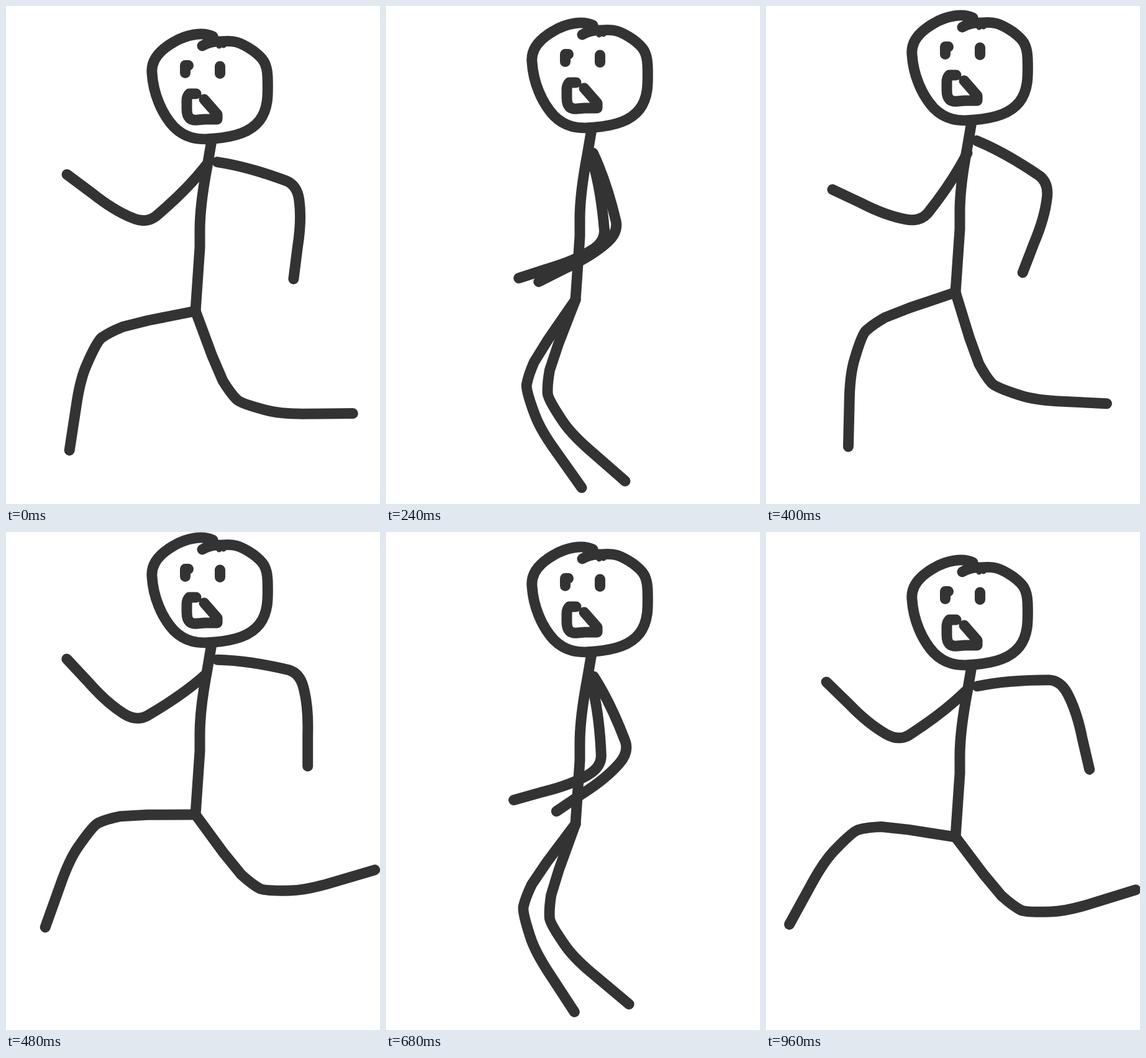
An HTML page for the animation above (1000 ms loop, 602 by 800 pixels).

```html
<!DOCTYPE html>
<html lang="en">
<head>
<meta charset="utf-8">
<title>Running stick figure</title>
<style>
  html, body { margin: 0; width: 100%; height: 100%; overflow: hidden; background: #fff; }
  svg { display: block; width: 100%; height: 100%; }
</style>
</head>
<body>
<svg viewBox="0 0 602 800">
  <defs>
    <path id="leg" d="M0 0L-46 62-70 98Q-80 119-83 133Q-85 142-72 181Q-65 203-45 234L0 302"/>
    <path id="arm" d="M7 8Q43 42 81 97Q91 113 80 134Q65 163 34 195L0 232.5"/>
  </defs>
  <g id="runner" fill="none" stroke="#333" stroke-width="17" stroke-linecap="round" stroke-linejoin="round">
    <!-- head and hair -->
    <path d="M333 49C316 41 290 46 270 58C247 71 233 87 235 108C237 140 250 172 270 194C288 212 308 216 335 213C370 210 394 202 408 184C422 166 422 144 421 113C420 92 414 84 398 72C376 57 366 55 346 57Q328 56 316 64"/>
    <path stroke-width="9" d="M343 64h.1M350 63h.1"/>
    <!-- eyes and mouth -->
    <path d="M293.500 95.500H288.500V107.500M344.500 97v11.500"/>
    <path d="M306 141H295Q291 145 291 152V165C291 180 297 184 308 183L320 182H340V174L319 150"/>
    <!-- torso -->
    <path d="M331 216L324 257Q312 320 312 360V388L305 490"/>
    <use class="limb" href="#leg"/>
    <use class="limb" href="#leg"/>
    <use class="limb" href="#arm"/>
    <use class="limb" href="#arm"/>
  </g>
</svg>
<script>
const STEP = 40, LOOP = 1000, HALF = 480;
const runner = document.getElementById('runner');
const limbs = document.querySelectorAll('.limb');

// Values at 0, 480 and 960 ms; angles are degrees from straight down, positive to the right.
const bob = [0, -36, 0];
const poses = [
  { x: 305, y: [490, 490, 490], angle: [-42.2, 72.9, -62.3] },
  { x: 305, y: [490, 490, 490], angle: [57, -53.2, 73.7] },
  { x: 329.5, y: [248, 240, 249], angle: [-84.4, 42.2, -92] },
  { x: 329.5, y: [248, 259, 249], angle: [35, -94.7, 55.3] }
];

function at(keys, t) {
  const i = t < HALF ? 0 : 1;
  return keys[i] + (keys[i + 1] - keys[i]) * (t / HALF - i);
}

function draw(now) {
  const t = Math.floor(now % LOOP / STEP) * STEP;
  runner.setAttribute('transform', `translate(0 ${at(bob, t)})`);
  poses.forEach(({ x, y, angle }, i) => {
    limbs[i].setAttribute('transform', `translate(${x} ${at(y, t)}) rotate(${-at(angle, t)})`);
  });
}

let start;
function tick(now) {
  start ??= now;
  draw(now - start);
  requestAnimationFrame(tick);
}
draw(0);
requestAnimationFrame(tick);
</script>
</body>
</html>
```
